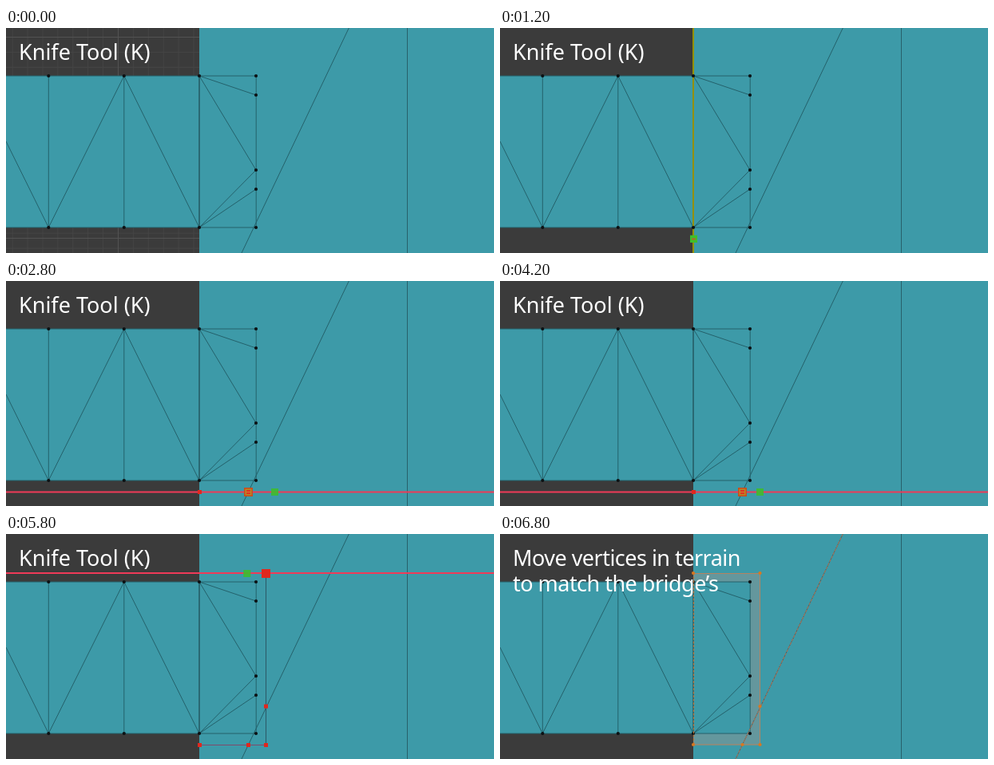
Write an HTML page that moves like this. It is 611 px wide and 282 px high and loops after 8 s.

```html
<!DOCTYPE html>
<html lang="en">
<head>
<meta charset="utf-8">
<title>Knife tool</title>
<style>
html, body { margin: 0; width: 100%; height: 100%; overflow: hidden; background: #3b3b3b; }
svg { display: block; width: 611px; height: 282px; }
text { font: 27px "Noto Sans", "Open Sans", sans-serif; fill: #fff; }
</style>
</head>
<body>
<svg id="stage" viewBox="0 0 611 282" xmlns="http://www.w3.org/2000/svg"></svg>
<script>
const LOOP = 8000, STEP = 100;
const TEAL = '#3d9aa8', EDGE = '#24616b', RED = '#e0281e', AXIS = '#f03a58';
const GREEN = '#3fbe2c', OLIVE = '#949008', ORANGE = '#d9781f';
const stage = document.getElementById('stage');

function add(tag, attrs, parent = stage) {
  const el = document.createElementNS('http://www.w3.org/2000/svg', tag);
  for (const k in attrs) el.setAttribute(k, attrs[k]);
  return parent.appendChild(el);
}
const group = () => add('g', {});
const path = (d, stroke, width, parent, extra) =>
  add('path', { d, stroke, 'stroke-width': width, fill: 'none', ...extra }, parent);
const rect = (x, y, width, height, fill, parent) =>
  add('rect', { x, y, width, height, fill }, parent);
const square = (x, y, size, fill, parent) =>
  rect(x - size / 2, y - size / 2, size, size, fill, parent);
const dot = (x, y, r, fill, parent) => add('circle', { cx: x, cy: y, r, fill }, parent);
const label = (y, str, parent, spacing = 0) => {
  add('text', { x: 16, y, 'letter-spacing': spacing }, parent).textContent = str;
};

// each part is visible during its [from, to) spans
const parts = [];
const show = (el, ...spans) => { parts.push({ el, spans }); return el; };

// viewport
rect(0, 0, 611, 282, '#3b3b3b');
const grid = show(group(), [0, 400]);
const gap = 18.9;
for (let x = 8.2; x < 242; x += gap) path(`M${x} 0V282`, '#454545', 1, grid);
for (let y = 11.5; y < 282; y += gap) path(`M0 ${y}H242`, '#454545', 1, grid);
path('M140.5 0V282M0 11.5H242M0 263.5H242', '#525252', 1, grid);

// terrain, filled cut and bridge
rect(242, 0, 369, 282, TEAL);
show(rect(242, 49, 84, 215.5, '#64979d'), [6700, LOOP]);
rect(0, 60, 313, 190, TEAL);

const DIAG = 'M429.3 0L295 282';
path(DIAG, EDGE, 1);
path('M502.5 0V282', '#28606a', 1);
path('M0 60H313.2V250H0M53.3 60V250M147.8 60V250M0 142L53.3 250L147.8 60L242 250' +
  'L313 178L242 60L313 84M242 250L313 202', EDGE, 1);
path('M242 60V250', '#1f4f57', 1.3);

// highlighted edges
show(path(DIAG, OLIVE, 2), [600, 900], [1700, 2300]);
show(path('M242 0V282', OLIVE, 2), [1000, 1500]);
show(path('M242 0V264', OLIVE, 2), [6200, 6600]);

for (const y of [60, 250]) for (const x of [53.3, 147.8, 242, 313]) dot(x, y, 2.1, '#0c1113');
for (const y of [84, 178, 202]) dot(313, y, 2.1, '#0c1113');

// cut so far
const CUT = '#7d4a6c';
show(path('M242 264.5H303.5', CUT, 1), [2300, 4400]);
show(path('M242 264.5H325.5', CUT, 1), [4400, 6700]);
show(path('M325.5 264V49', '#2b5867', 1), [5700, 6700]);
show(path('M325.5 49.5H242', CUT, 1), [6600, 6700]);

// angle constraint lines
const lowAxis = show(path('M0 264.5H611', AXIS, 2), [1500, 4400]);
show(path('M326 0V282', '#a6da08', 2), [4700, 5700]);
show(path('M0 49H611', AXIS, 2), [5700, 6600]);

// knife cursor
const cursor = show(square(0, 0, 9, GREEN), [400, 4400], [4700, 6600]);
cursor.setAttribute('opacity', 0.88);

// cut points
const first = show(group(), [1200, 2300]);
square(242.5, 264.5, 9, GREEN, first);
rect(240, 263.5, 5, 2, '#b8632c', first);
const point = (x, y, from) => show(square(x, y, 5, RED), [from, 6700]);
const active = (x, y, from, to) => show(square(x, y, 11, RED), [from, to]);
point(242.5, 264.5, 2300);
point(303.5, 264.5, 4400);
point(325.5, 264.5, 5700);
point(325.5, 216, 5700);
point(325.5, 49.5, 6600);
const hit = show(group(), [2300, 4400]);
square(303.5, 264.5, 11, '#cc4a1c', hit);
square(303.5, 264.5, 8, '#b58a25', hit);
square(303.5, 264.5, 5, RED, hit);
rect(301, 263.5, 5, 2, '#d8682a', hit);
active(325.5, 264.5, 4400, 5700);
active(325.5, 49.5, 5700, 6600);
active(242.5, 49.5, 6600, 6700);

// selected result
const result = show(group(), [6700, LOOP]);
path('M242 49.5H325.5V264H242', '#b5835f', 1, result);
path('M242.5 49V264', '#b9773f', 1.2, result, { 'stroke-dasharray': '3 1.5' });
path(DIAG, '#a6745a', 1.1, result, { 'stroke-dasharray': '4 1' });
for (const [x, y] of [[242, 49], [325.5, 49], [325.5, 216], [325.5, 264], [303.5, 264], [242, 264]])
  dot(x, y, 2.1, ORANGE, result);

// captions
label(39.5, 'Knife Tool (K)', show(group(), [0, 6800]));
const caption = show(group(), [6800, LOOP]);
label(39.5, 'Move vertices in terrain', caption, -0.52);
label(71.5, 'to match the bridge’s', caption, -0.52);

// cursor route: time, x, y
const route = [
  [400, 394, 194], [700, 318.5, 230.5], [1000, 242.5, 264], [1500, 242.5, 264.5],
  [1700, 303.5, 264.5], [2400, 303.5, 264.5], [2600, 334.5, 264.5], [2700, 334.5, 264.5],
  [2900, 338.5, 264.5], [3000, 338.5, 264.5], [3100, 336.5, 264.5], [3400, 336.5, 264.5],
  [3600, 334.5, 264.5], [3700, 334.5, 264.5], [4200, 325.5, 264.5], [4600, 325.5, 264.5],
  [4700, 325.5, 185.5], [4800, 325.5, 185.5], [5200, 325.5, 84.5], [5500, 325.5, 49.5],
  [5600, 325.5, 49.5], [6300, 242.5, 49.5], [LOOP, 242.5, 49.5]
];

function place(t) {
  const i = Math.max(1, route.findIndex(k => k[0] >= t));
  const [t0, x0, y0] = route[i - 1], [t1, x1, y1] = route[i];
  const p = Math.min(1, Math.max(0, (t - t0) / (t1 - t0)));
  return [x0 + (x1 - x0) * p, y0 + (y1 - y0) * p];
}

function draw(t) {
  t = Math.floor(t / STEP) * STEP;
  for (const { el, spans } of parts)
    el.style.display = spans.some(([a, b]) => t >= a && t < b) ? '' : 'none';
  const [x, y] = place(t);
  cursor.setAttribute('x', x - 4.5);
  cursor.setAttribute('y', y - 4.5);
}

const start = performance.now();
function tick() {
  draw((performance.now() - start) % LOOP);
  requestAnimationFrame(tick);
}
tick();
</script>
</body>
</html>
```
